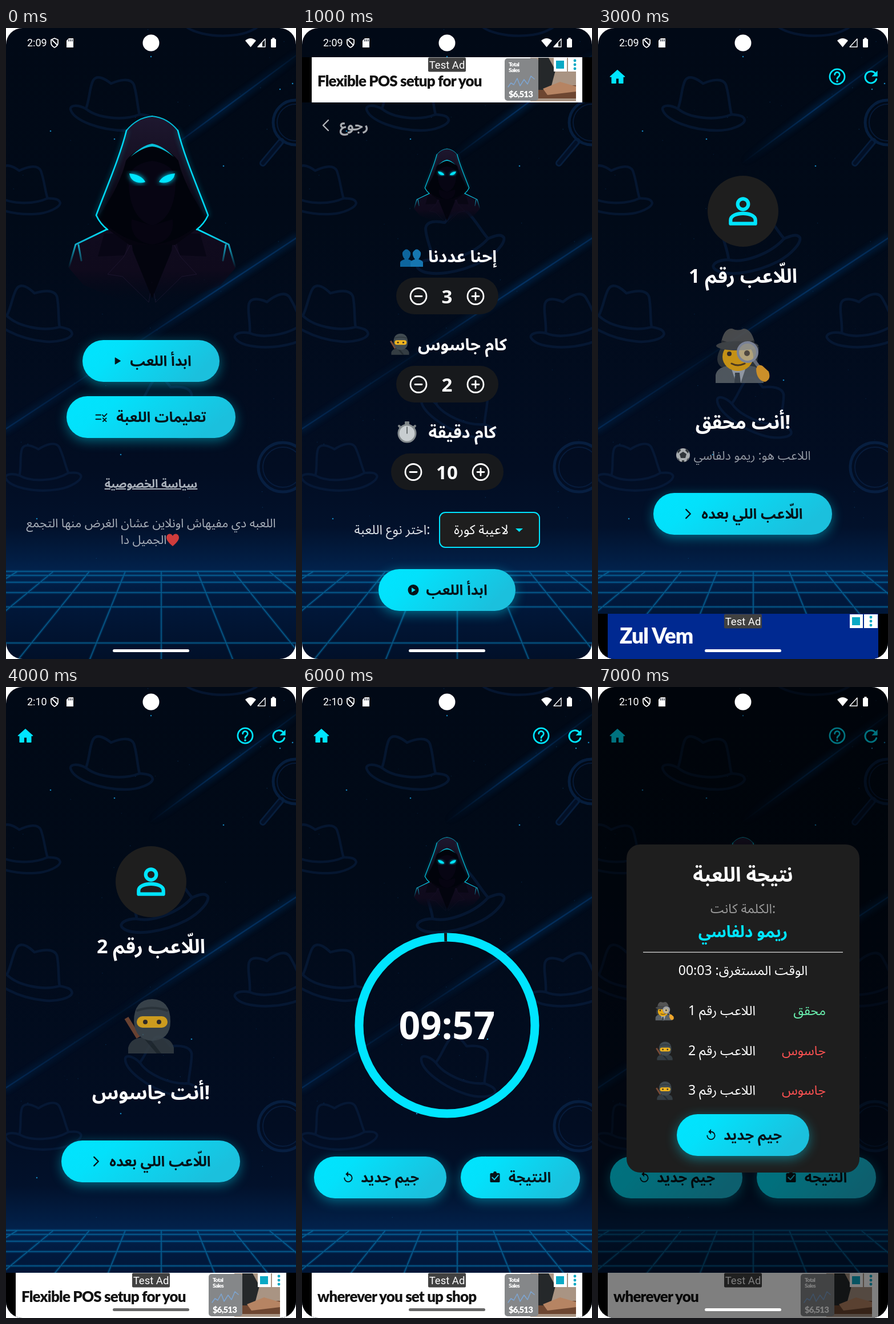
An HTML page that plays this animation: 508 by 1102 pixels, repeating every 8 s.

```html
<!DOCTYPE html>
<html lang="ar">
<head>
<meta charset="utf-8">
<style>
html, body { margin: 0; height: 100%; overflow: hidden; background: #fff; }
svg { display: block; width: 100vw; height: 100vh; border-radius: 29px; }
text { font-family: "Noto Sans", "Noto Sans Arabic", "DejaVu Sans", sans-serif; }
.ui { font-family: Roboto, sans-serif; }
.ad { font-family: Lato, sans-serif; font-weight: 900; letter-spacing: -.85px; }
.line { fill: none; stroke-linecap: round; stroke-linejoin: round; }
.glow { filter: drop-shadow(0 5px 10px rgba(0, 229, 255, .42)); }
</style>
</head>
<body>
<svg id="stage" viewBox="0 0 508 1102" preserveAspectRatio="none">
<defs>
  <linearGradient id="night" x2="0" y2="1">
    <stop stop-color="#010916"/><stop offset=".3" stop-color="#010a18"/><stop offset=".7" stop-color="#020d22"/>
    <stop offset=".79" stop-color="#02112b"/><stop offset=".86" stop-color="#02224c"/>
    <stop offset=".9" stop-color="#01193d"/><stop offset="1" stop-color="#011029"/>
  </linearGradient>
  <linearGradient id="cyan" x2="1" y2=".3"><stop stop-color="#00e5ff"/><stop offset=".3" stop-color="#03e1fb"/><stop offset="1" stop-color="#1bc0dd"/></linearGradient>
  <linearGradient id="coat" gradientUnits="userSpaceOnUse" x1="0" y1="200" x2="0" y2="325">
    <stop stop-color="#100b1e"/><stop offset=".55" stop-color="#0f0a1c"/><stop offset="1" stop-color="#050817" stop-opacity="0"/>
  </linearGradient>
  <linearGradient id="hood" gradientUnits="userSpaceOnUse" x1="0" y1="0" x2="0" y2="220">
    <stop stop-color="#1e172f"/><stop offset=".35" stop-color="#151022"/><stop offset=".7" stop-color="#080613"/><stop offset="1" stop-color="#05040f"/>
  </linearGradient>
  <linearGradient id="edge" gradientUnits="userSpaceOnUse" x1="0" y1="198" x2="0" y2="265">
    <stop stop-color="#00e5ff"/><stop offset=".4" stop-color="#13a9c6"/><stop offset="1" stop-color="#13a9c6" stop-opacity="0"/>
  </linearGradient>
  <linearGradient id="beamA" gradientUnits="userSpaceOnUse" x1="250" y1="238" x2="508" y2="48">
    <stop stop-color="#07488c" stop-opacity="0"/><stop offset=".5" stop-color="#07488c" stop-opacity=".6"/><stop offset="1" stop-color="#07488c" stop-opacity=".15"/>
  </linearGradient>
  <linearGradient id="beamB" gradientUnits="userSpaceOnUse" x1="0" y1="700" x2="508" y2="367">
    <stop stop-color="#07488c" stop-opacity=".45"/><stop offset=".4" stop-color="#07488c" stop-opacity=".1"/>
    <stop offset=".75" stop-color="#07488c" stop-opacity=".65"/><stop offset="1" stop-color="#07488c" stop-opacity=".5"/>
  </linearGradient>
  <filter id="blur" x="-30%" y="-30%" width="160%" height="160%"><feGaussianBlur stdDeviation="5"/></filter>

  <g id="hat" class="line" stroke="#0a2348" stroke-width="4.5">
    <path d="M-44 8C-60 0-72 2-71 9C-66 28-20 46 25 46C50 46 72 36 73 28C72 20 62 19 50 18"/>
    <path d="M-44 8C-37-10-38-30-31-42C-24-52-10-44 0-36C14-42 34-47 40-34C46-15 46 5 50 18M-44 8C-25 24 20 30 50 18"/>
  </g>

  <g id="halfSpy">
    <path fill="url(#coat)" d="M-78 197L-134 224L-146 265L-120 295L-60 320L0 330V200Z"/>
    <path fill="#070613" opacity=".8" d="M-84 205L-95 245L-48 243L-40 205Z"/>
    <path fill="url(#coat)" stroke="#2b2140" stroke-opacity=".5" d="M-50 246L-78 276L-52 280L-6 325L0 290L-36 220Z"/>
    <path fill="#03040e" d="M0 190L-38 200L-34 235L0 318Z"/>
    <path fill="url(#hood)" d="M0 0C-22 2-36 14-45 25C-56 70-82 130-98 173C-92 186-84 194-74 200L-40 225L0 224Z"/>
    <path fill="#01030b" d="M0 53C-20 54-38 66-46 78C-56 120-80 155-94 176C-72 200-40 222 0 224Z"/>
    <path fill="#070513" d="M0 78C-28 82-40 95-41 110C-42 145-32 182 0 191Z"/>
    <path fill="#060411" d="M0 191L-36 180C-40 210-20 222 0 224Z"/>
    <g class="line" stroke="#00d9f5">
      <path stroke-width="5" opacity=".3" filter="url(#blur)" d="M-45 25C-56 70-82 130-98 173"/>
      <path stroke-width="2" opacity=".85" d="M0 0C-22 2-36 14-45 25"/>
      <path stroke-width="2.6" d="M-45 25C-56 70-82 130-98 173C-92 186-86 192-78 198"/>
      <path stroke="url(#edge)" stroke-width="3" d="M-80 198L-134 224L-146 265M-129 225L-124 252"/>
    </g>
    <path fill="#08bfd8" d="M0 48Q-18 51-38 71Q-16 54 0 53Z"/>
  </g>
  <path id="eye" d="M-40 100C-28 101-16 106-12 115C-24 119-38 114-40 100Z"/>
  <g id="spy">
    <use href="#halfSpy"/><use href="#halfSpy" transform="scale(-1 1)"/>
    <g fill="#00e5ff">
      <g filter="url(#blur)"><use href="#eye"/><use href="#eye" transform="scale(-1 1)"/></g>
      <use href="#eye"/><use href="#eye" transform="scale(-1 1)"/>
    </g>
  </g>

  <g id="detective">
    <path fill="#343a3f" d="M-38-15Q-52 10-38 20H24L28-15Z"/>
    <path fill="#5c6369" d="M-48 48V34Q-45 20-25 18H12Q32 20 36 34V48Z"/>
    <path fill="#a8afb8" d="M-22 18L-12 48H-4L6 18Z"/><path fill="#424a51" d="M-14 30H-6L-4 48H-15Z"/>
    <ellipse cx="-9" cy="2" rx="27" ry="25" fill="#e7a915"/>
    <path fill="#545454" d="M-38-24Q-33-48-19-47Q-9-42 1-47Q15-46 20-24Z"/>
    <path fill="#303336" d="M-38-27Q-9-16 20-27V-18H-38Z"/>
    <ellipse cx="-10" cy="-17" rx="37" ry="8" fill="#484a4b"/>
    <circle cx="-24" cy="-3" r="4" fill="#3b302b"/>
    <path class="line" stroke="#573f20" stroke-width="3" d="M-20 14Q-9 20 3 14"/>
    <path stroke="#777b86" stroke-width="6" d="M19 8L34 28"/>
    <circle cx="8" cy="-6" r="17" fill="#c9c5b4" opacity=".75"/><circle cx="7" cy="-4" r="5" fill="#5c5347"/>
    <circle cx="8" cy="-6" r="17" fill="none" stroke="#9097ac" stroke-width="4"/>
    <path fill="#efa62c" d="M23 24Q25 14 34 18L45 28Q50 43 38 46Q24 43 23 24Z"/>
  </g>
  <g id="ninja">
    <path stroke="#7b4b35" stroke-width="8" d="M-43-14L-22 20"/>
    <path fill="#343d43" d="M-40 48V38Q-36 22-16 20H18Q36 22 40 38V48Z"/>
    <path fill="#242c31" d="M-14 20L10 48H18L-4 20Z"/>
    <path fill="#414b51" d="M-30-8Q-30-46 2-47Q34-46 34-8Q34 24 2 26Q-28 24-30-8Z"/>
    <rect x="-25" y="-17" width="54" height="20" rx="10" fill="#f0b51f"/>
    <circle cx="-10" cy="-7" r="4" fill="#38302a"/><circle cx="14" cy="-7" r="4" fill="#38302a"/>
    <path class="line" stroke="#30393f" stroke-width="4" d="M-24-27Q2-36 28-27"/>
  </g>
</defs>
</svg>
<script>
const CYAN = '#00e5ff', PANEL = '#1e1e1e', HERO = 'ريمو دلفاسي';
const BODY = 23, TITLE = 34;
const stage = document.getElementById('stage');

const text = (x, y, size, str, fill = '#fff', weight = 400, extra = '') =>
  `<text x="${x}" y="${y}" font-size="${size}" fill="${fill}" font-weight="${weight}" text-anchor="middle" ${extra}>${str}</text>`;
const rect = (x, y, w, h, r, fill, extra = '') =>
  `<rect x="${x}" y="${y}" width="${w}" height="${h}" rx="${r}" fill="${fill}" ${extra}/>`;
const circle = (x, y, r, fill, extra = '') => `<circle cx="${x}" cy="${y}" r="${r}" fill="${fill}" ${extra}/>`;
const use = (id, x, y, scale = 1, turn = 0, extra = '') =>
  `<use href="#${id}" transform="translate(${x} ${y}) rotate(${turn}) scale(${scale})" ${extra}/>`;
const line = (d, color, width, extra = '') =>
  `<path class="line" d="${d}" stroke="${color}" stroke-width="${width}" ${extra}/>`;

// Icons are drawn around their own centre in a 24-unit box.
const icons = {
  play: c => `<path fill="${c}" d="M-4-6L6 0L-4 6Z" stroke="${c}" stroke-linejoin="round"/>`,
  playDisc: c => circle(0, 0, 10, c) + '<path fill="#0adcf5" d="M-3-4.5L4 0L-3 4.5Z"/>',
  rules: c => line('M-10-4H-1M-10 4H-1M2-4L5-1L10-6M3 2L9 8M9 2L3 8', c, 2),
  back: c => line('M4-9L-5 0L4 9', c, 2.4),
  next: c => line('M-4-8L4 0L-4 8', c, 2.4),
  home: c => `<path fill="${c}" stroke="${c}" stroke-linejoin="round" d="M-2 8V2H2V8H7V0H9L0-8L-9 0H-7V8Z"/>`,
  help: c => line('M9 0A9 9 0 1 1-9 0A9 9 0 1 1 9 0M-3-2.4A3 3 0 1 1 2-.2Q0 1 0 2.7', c, 1.9) + circle(0, 5.6, 1.3, c),
  refresh: c => line('M6.7 2.2A7 7 0 1 1 5-5', c, 2) + `<path fill="${c}" d="M8-8V-1H1Z"/>`,
  replay: c => line('M-7 1A7 7 0 1 0 0-6', c, 2) + `<path fill="${c}" d="M0-11V-1L-5-6Z"/>`,
  person: c => line('M3-4A3 3 0 1 1-3-4A3 3 0 1 1 3-4M-7 7V5C-7 0 7 0 7 5V7Z', c, 2),
  ballot: c => `<path fill="${c}" d="M-9 2L-6-1H-4L1 4L7-1L9 2V8Q9 9 8 9H-8Q-9 9-9 8Z"/>` + line('M-5-2L1-8L6-3L0 3Z', c, 1.8),
  result: c => rect(-9, -8, 18, 17, 2, c) + circle(0, -8, 3, c) + line('M-5 0L-1 4L6-4', '#19cbe8', 2)
};
const icon = (name, x, y, scale = 1, color = '#06141a') =>
  `<g transform="translate(${x} ${y}) scale(${scale})">${icons[name](color)}</g>`;

const button = (x, y, w, label, labelX, name, iconX) =>
  rect(x, y, w, 73, 36.5, 'url(#cyan)', 'class="glow"') +
  text(labelX, y + 45, 25, label, '#06141a', 700) + icon(name, iconX, y + 36.5, .95);
const spy = y => use('spy', 254, y, .395);

function background() {
  const stars = [[254, 50], [381, 241], [201, 745], [54, 857], [480, 107], [190, 194], [240, 607], [325, 615], [502, 97], [78, 180]];
  let seed = 7;
  const random = () => (seed = seed * 16807 % 2147483647) / 2147483647;
  let out = rect(0, 0, 508, 1102, 0, 'url(#night)');
  for (let i = 0; i < 70; i++) out += circle(random() * 508, random() * 940, .8, '#1763a0', `opacity="${random() * .4}"`);
  out += stars.map(([x, y]) => circle(x, y, 1.3, '#1581b8')).join('');
  const hats = [[184, 133, 1, 0], [25, 283, .94, -3], [46, 499, 1, 6], [467, 513, 1, -16], [268, 375, 1.1, -27],
    [278, 661, .98, 17], [62, 768, .91, -9], [375, -28, .95, -8]];
  out += hats.map(([x, y, s, a]) => use('hat', x, y, s, a, 'opacity=".5"')).join('');
  out += `<g opacity=".65">${circle(507, 165, 39, 'none', 'stroke="#0a2850" stroke-width="5"')}
    ${circle(507, 165, 32, 'none', 'stroke="#0a2348" stroke-width="2"')}
    ${line('M482 198L450 236', '#0a2850', 12)}${line('M480 200L450 236', '#04132d', 6)}
    ${circle(485, 767, 43, 'none', 'stroke="#0a2850" stroke-width="5"')}
    ${circle(485, 767, 35, 'none', 'stroke="#0a2348" stroke-width="2"')}</g>`;
  for (const [d, id] of [['M250 238L508 48', 'beamA'], ['M0 700L508 367', 'beamB']])
    out += line(d, `url(#${id})`, 14, 'opacity=".45" filter="url(#blur)"') + line(d, `url(#${id})`, 2.5, 'opacity=".75"');
  let grid = '';
  for (let k = -6; k <= 6; k++) grid += `M${272 + k * 63} 949L${272 + k * 125} 1102`;
  for (const y of [949, 956, 968, 986, 1011, 1074]) grid += `M0 ${y}H508`;
  return out + line(grid, '#087bc2', 5, 'opacity=".18"') + line(grid, '#0992c9', 1.5, 'opacity=".5"');
}

function statusBar(clock, signalFill, navColor) {
  return `<text class="ui" x="37" y="32" font-size="18" fill="#fff">${clock}</text>` +
    line('M85 18L91 20.5V26Q91 31 85 34Q79 31 79 26V20.5ZM81 21L90 30', '#fff', 1.8) +
    '<path fill="#fff" d="M110 18H118V34H106V22Z"/>' + line('M110 20V23M113 20V23M116 20V23', '#02091a', 1.2) +
    circle(254, 26, 14.5, '#fff') +
    '<path fill="#fff" d="M419 22Q428.500 14 438 22L428.500 33.500Z"/>' +
    line('M454 19V33H441Z', '#fff', 1.4) + `<path fill="${signalFill}" d="M449 24V33H441Z"/>` +
    rect(464, 19, 9, 15, 1.5, '#fff') + rect(466.500, 17, 4, 3, 0, '#fff') +
    rect(187, 1085, 134, 5, 2.5, navColor);
}

function banner(y, content, fill = '#fff') {
  return `<g transform="translate(0 ${y})">${rect(0, 51, 508, 79, 0, '#000')}${rect(17, 51, 474, 79, 0, fill)}${content}
    ${rect(221, 51.500, 66, 25, 2, '#414141')}${text(254, 71, 18.5, 'Test Ad', '#fff', 400, 'class="ui"')}
    ${rect(441, 52, 23, 24, 0, '#fff')}${rect(466, 52, 24, 24, 0, '#fff')}${rect(445, 57, 14, 14, 0, '#0aa9c5')}
    ${[57, 64, 71].map(cy => circle(478, cy, 2.4, '#0aa9c5')).join('')}</g>`;
}
const slogan = str => `<text class="ad" x="27" y="102" font-size="26" fill="#111">${str}</text>`;
const photo = rect(400, 52, 80, 76, 0, '#a99483') + rect(414, 100, 66, 23, 0, '#6d4631') +
  '<path fill="#25282a" d="M414 52H432L444 74L435 108H414Z"/><path fill="#b68463" d="M422 106L452 94L480 102V111L430 117Z"/>' +
  rect(355, 53, 59, 74, 5, '#858789') +
  '<text class="ad" x="362" y="67" font-size="10" fill="#fff">Total<tspan x="362" y="77">Sales</tspan></text>' +
  line('M361 103L366 96L371 99L377 88L382 101L389 90L395 98L401 84L407 89', '#7da5d2', 1.5) +
  '<text class="ad" x="362" y="121" font-size="15" fill="#fff">$6,513</text>';
const shopAd = str => banner(972, slogan(str) + photo);

const toolbar = icon('home', 34, 85, 1.4, CYAN) + icon('help', 419, 85, 1.45, CYAN) + icon('refresh', 478, 86, 1.45, CYAN);

function stepper(y, label, value, emoji, x = 165) {
  const w = 508 - 2 * x + 1, left = x + 39, right = 508 - left, cy = y + 32.5;
  return text(281, y - 27, 29, label, '#fff', 700) + emoji + rect(x, y, w, 64, 32, '#17191c') +
    text(254, y + 45, 33, value, '#fff', 700) +
    [left, right].map(cx => circle(cx, cy, 14, 'none', 'stroke="#fff" stroke-width="2.8"')).join('') +
    line(`M${left - 6} ${cy}h12M${right - 6} ${cy}h12M${right} ${cy - 6}v12`, '#fff', 2.8);
}

const busts = [[183, '#0d659d'], [201, '#1676b0']].map(([x, c]) =>
  `<path fill="${c}" d="M${x - 11} 417V409Q${x - 10} 406 ${x - 3} 404Q${x - 8} 398 ${x - 7} 392Q${x} 381 ${x + 7} 392Q${x + 8} 398 ${x + 3} 404Q${x + 10} 406 ${x + 11} 409V417Z"/>`).join('');
const stopwatch = rect(180, 687, 8, 7, 1, '#7e8487') + line('M170 695L173 698M198 695L195 698', '#7e8487', 4) +
  circle(184, 708, 15, '#c8cdd0', 'stroke="#858b8e" stroke-width="3"') +
  line('M184 697V708', '#4b5053', 1.5);
const ball = circle(149, 746, 12, '#a9adb0') +
  '<path fill="#30353a" d="M149 740L155 744L153 751H145L143 744ZM139 739L144 735L145 738L140 743ZM154 735L159 739L158 743L153 738ZM138 750L142 753L143 757ZM160 750L156 753L155 757ZM147 755H151V758H147Z"/>';

const player = (n, y) => circle(254, y, 62, PANEL) + icon('person', 254, y, 3.1, CYAN) +
  text(254, y + 125, TITLE, `اللّاعب رقم ${n}`, '#fff', 700);
const nextPlayer = y => button(97, y, 313, 'اللّاعب اللي بعده', 270, 'next', 158);

function timer(y, label, elapsed) {
  const angle = -elapsed / 600 * 2 * Math.PI;
  const gap = elapsed ? `<path fill="none" stroke="#141619" stroke-width="15" d="M254 ${y - 154}A154 154 0 0 0 ${254 + 154 * Math.sin(angle)} ${y - 154 * Math.cos(angle)}"/>` : '';
  return spy(y - 328.500) + circle(254, y, 154, 'none', `stroke="${CYAN}" stroke-width="15"`) + gap + text(254, y + 24, 65.5, label, '#fff', 700);
}

const paused = ad => toolbar + timer(591, '09:57', 3) + button(21, 820, 232, 'جيم جديد', 154, 'replay', 81) +
  button(278, 820, 209, 'النتيجة', 399, 'result', 338) + shopAd(ad);

const resultRow = (n, role, color, emoji) => {
  const y = 503.500 + n * 69.500;
  return use(emoji, 117, y - 7, .34) + text(217, y, BODY, `اللاعب رقم ${n}`) +
    `<text x="399" y="${y}" font-size="${BODY}" fill="${color}" text-anchor="end">${role}</text>`;
};

const heart = '<path fill="#cf3c3c" d="M292 905C285 899 281 894 281 890C281 883 289 881 292 887C295 881 303 883 303 890C303 894 299 899 292 905Z"/>';

const scenes = [
  use('spy', 256, 154) + button(134, 545, 240, 'ابدأ اللعب', 271, 'play', 195) +
    button(106, 643, 296, 'تعليمات اللعبة', 272, 'rules', 167) +
    text(254, 803, 20, 'سياسة الخصوصية', '#a9b0ba', 600, 'text-decoration="underline"') +
    text(254, 872, 21.3, 'اللعبه دي مفيهاش اونلاين عشان الغرض منها التجمع', '#a9b0ba') +
    text(241, 901, 21.3, 'الجميل دا', '#a9b0ba') + heart,

  banner(0, slogan('Flexible POS setup for you') + photo) + icon('back', 42, 170, 1, '#b1b4b8') +
    text(91, 179, 24, 'رجوع', '#a8abb0', 600) + spy(211) +
    stepper(436, 'إحنا عددنا', 3, busts) + stepper(590, 'كام جاسوس', 2, use('ninja', 172, 552, .39)) +
    stepper(743, 'كام دقيقة', 10, stopwatch, 156) +
    rect(241, 846, 175, 61, 10, PANEL, `stroke="${CYAN}" stroke-width="2"`) + text(314, 884, BODY, 'لاعيبة كورة') +
    `<path fill="${CYAN}" d="M374 874H387L380.500 880Z"/>` + text(158, 884, BODY, 'اختر نوع اللعبة:', '#dde1e7') +
    button(134, 945, 240, 'ابدأ اللعب', 271, 'playDisc', 195),

  toolbar + player(1, 466) + button(134, 670, 240, 'اعرف دورك', 271, 'play', 195) + shopAd('wherever you set up shop'),

  toolbar + player(1, 320) + use('detective', 254, 572, 1, 0, 'opacity=".85"') + text(254, 700, TITLE, 'أنت محقق!', '#fff', 700) +
    text(270, 754, 21.5, `اللاعب هو: ${HERO}`, '#9298a2') + ball + nextPlayer(812) +
    banner(972, '<text class="ad" x="38" y="103" font-size="37" fill="#fff">Zul Vem</text>', '#002991'),

  toolbar + player(2, 340) + use('ninja', 254, 592, 1, 0, 'opacity=".85"') + text(254, 720, TITLE, 'أنت جاسوس!', '#fff', 700) +
    nextPlayer(792) + shopAd('Flexible POS setup for you'),

  toolbar + timer(547.500, '10:00', 0) + circle(254, 794, 36, '#fff') + line('M247 784V804M261.500 784V804', '#111820', 7) +
    button(119, 863, 270, 'ابدأ التصويت', 271, 'ballot', 179) +
    banner(972, slogan('All the ways <tspan fill="#1677ef">customers love</tspan> to pay')),

  paused('wherever you set up shop'),

  paused('wherever you') + rect(0, 0, 508, 1102, 0, '#000', 'opacity=".5"') + rect(50, 275, 408, 573, 24, PANEL) +
    text(254, 340, 35, 'نتيجة اللعبة', '#fff', 700) + text(254, 395, BODY, 'الكلمة كانت:', '#9a9a9a') +
    text(254, 437, 28, HERO, CYAN, 700) + rect(79, 462.500, 350, 1.5, 0, '#bcbcbc') +
    text(254, 503, BODY, 'الوقت المستغرق: 00:03') +
    resultRow(1, 'محقق', '#69f0ae', 'detective') + resultRow(2, 'جاسوس', '#ff5252', 'ninja') +
    resultRow(3, 'جاسوس', '#ff5252', 'ninja') + button(138, 746, 232, 'جيم جديد', 271, 'replay', 198)
];

stage.insertAdjacentHTML('beforeend', background() + scenes.map((scene, i) =>
  `<g class="scene" display="none">${scene}${statusBar(i < 4 ? '2:09' : '2:10', i < 2 ? '#fff' : 'none', [2, 4, 5, 6].includes(i) ? '#686868' : '#fff')}</g>`).join(''));

const layers = [...stage.querySelectorAll('.scene')];
function draw() {
  const current = Math.floor(performance.now() % 8000 / 1000);
  layers.forEach((layer, i) => layer.setAttribute('display', i === current ? 'inline' : 'none'));
  requestAnimationFrame(draw);
}
draw();
</script>
</body>
</html>
```
